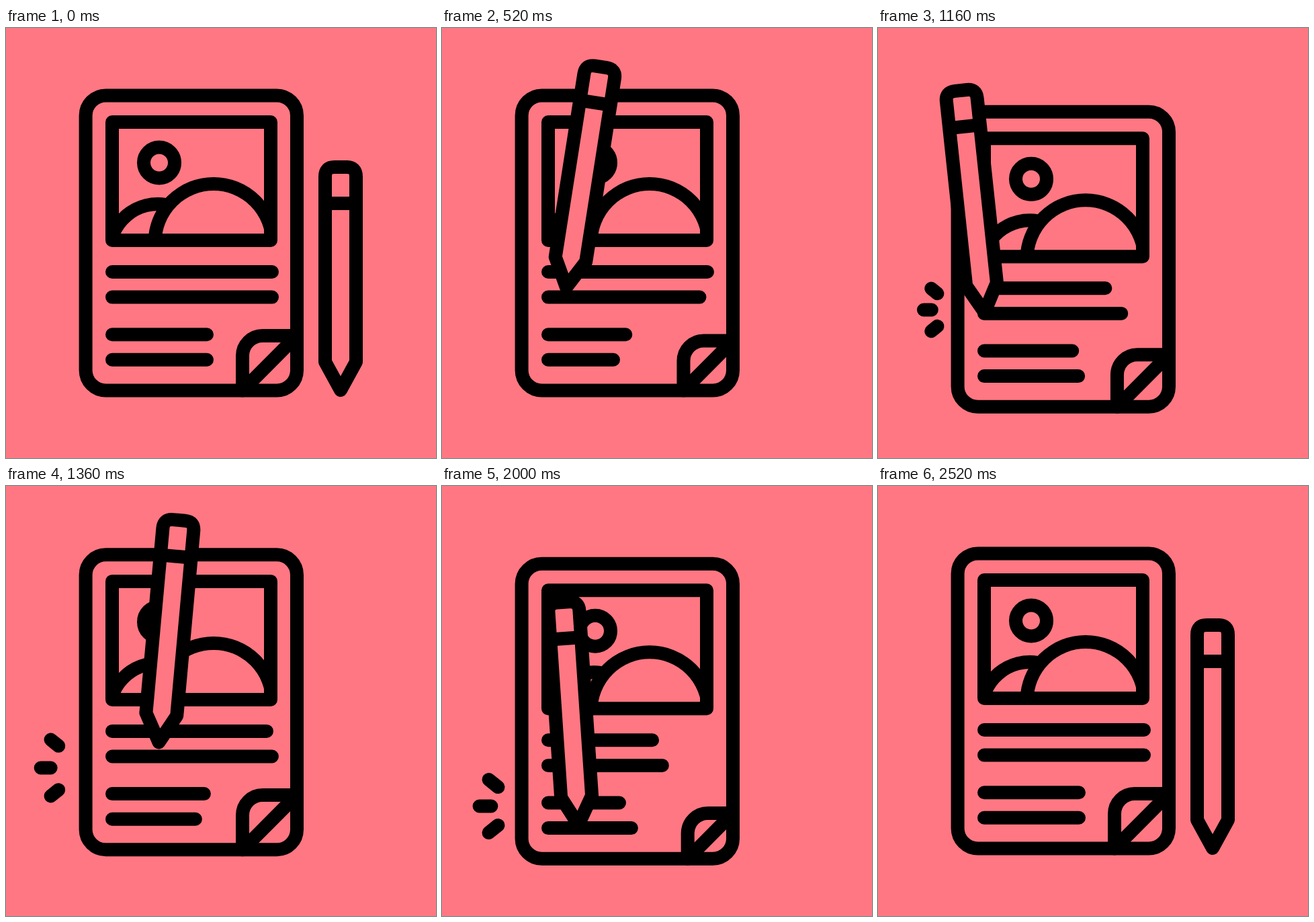
An HTML page that plays this animation: 640x640 px, repeating every 3 s.

```html
<!DOCTYPE html>
<html lang="en">
<head>
<meta charset="utf-8">
<title>Page and pencil</title>
<style>
  html, body { margin: 0; width: 100%; height: 100%; overflow: hidden; background: #ff7782; }
  svg { display: block; width: 100vw; height: 100vh; }
</style>
</head>
<body>
<svg viewBox="0 0 640 640" fill="none" stroke="#000" stroke-width="20" stroke-linejoin="round">
  <clipPath id="frame"><rect x="158" y="140" width="236" height="176"/></clipPath>
  <path id="sparks" stroke-linecap="round"/>
  <g id="page">
    <rect x="118.6" y="100.4" width="314.4" height="439" rx="30"/>
    <g clip-path="url(#frame)">
      <path d="M154 334A72 72 0 0 1 238 263"/>
      <circle cx="309" cy="319.5" r="87.5"/>
    </g>
    <rect x="158" y="140" width="236" height="176"/>
    <circle cx="228" cy="200.5" r="23"/>
    <path id="lines" stroke-linecap="round"/>
    <path id="fold" stroke-linecap="round"/>
  </g>
  <g id="pencil">
    <path fill="#ff7782" d="M-23-52V-328q0-14 14-14h18q14 0 14 14V-52L0-10Z"/>
    <path d="M-23-288H23"/>
  </g>
</svg>
<script>
const LOOP = 3000, STEP = 40;
const set = (id, name, value) => document.getElementById(id).setAttribute(name, value);
const clamp = v => Math.min(1, Math.max(0, v));
const wave = p => p > 0 && p < 1 ? Math.sin(Math.PI * p) ** 2 : 0;
const twice = (t, start, length) => wave((t - start) / length) + wave((t - start - length) / length);

// Pencil poses: swing up, strike, lift, strike lower, return to rest
const rest = { x: 498, y: 549, tilt: 0 };
const poses = [
  { at: 220, ...rest },
  { at: 520, x: 183.4, y: 395.7, tilt: 8.9 },
  { at: 780, x: 188, y: 370, tilt: 9.2 },
  { at: 1160, x: 159.6, y: 433, tilt: -6.1 },
  { at: 1360, x: 226.6, y: 391.5, tilt: 5.2 },
  { at: 1760, x: 199.4, y: 413.5, tilt: 3.1 },
  { at: 1880, x: 152, y: 488, tilt: -5 },
  { at: 2200, x: 362, y: 538.5, tilt: -1 },
  { at: 2510, ...rest }
];

// Monotone cubic curve through one property of the poses
function pose(key, t) {
  const last = poses.length - 1;
  if (t <= poses[0].at || t >= poses[last].at) return rest[key];
  const rate = i => (poses[i + 1][key] - poses[i][key]) / (poses[i + 1].at - poses[i].at);
  const slope = i => {
    if (i === 0 || i === last) return 0;
    const a = rate(i - 1), b = rate(i);
    return a * b > 0 ? 2 * a * b / (a + b) : 0;
  };
  const i = poses.findIndex(p => p.at > t) - 1;
  const from = poses[i], to = poses[i + 1];
  const d = to.at - from.at, u = (t - from.at) / d, v = 1 - u;
  return v * v * (1 + 2 * u) * from[key] + u * u * (3 - 2 * u) * to[key]
    + d * u * v * (v * slope(i) - u * slope(i + 1));
}

// Two long lines, a gap, two short lines; the lowest moves first
function linePath(t) {
  let d = "";
  for (let i = 0; i < 4; i++) {
    const long = i < 2;
    const y = 363 + 37.6 * i + (long ? 0 : 18);
    const pull = (long ? 86 : 66) * twice(t, 225 + 87 * (3 - i), 970);
    d += `M158 ${y}H${(long ? 396 : 299) - pull}`;
  }
  return d;
}

// Three rays fan out to the left; the tail follows the head
function burst(age, hubY) {
  if (age <= 0 || age >= 550) return "";
  const head = 1 - (1 - clamp(age / 330)) ** 2;
  const tail = (1 - Math.cos(Math.PI * clamp((age - 30) / 520))) / 2;
  let d = "";
  for (let i = -1; i <= 1; i++) {
    const angle = i * 39 * Math.PI / 180;
    const point = p => {
      const r = 38 + 29.5 * p;
      return `${118.5 - r * Math.cos(angle)} ${hubY + r * Math.sin(angle)}`;
    };
    d += `M${point(tail)}L${point(head)}`;
  }
  return d;
}

function draw(t) {
  const sink = 25 * (wave((t - 850) / 560) + wave((t - 1600) / 560));
  set("page", "transform", `translate(0 ${sink})`);
  set("lines", "d", linePath(t));

  const s = 14.5 * twice(t, 235, 1120), x = 352 + s, y = 458 + s;
  set("fold", "d", `M${x} 539.4V${y + 30}a30 30 0 0 1 30-30H433L${x} 539.4`);

  set("sparks", "d", burst(t - 1080, 419.5) + burst(t - 1800, 476.5));
  set("pencil", "transform",
    `translate(${pose("x", t)} ${pose("y", t)}) rotate(${pose("tilt", t)})`);
}

function tick() {
  const t = performance.now() % LOOP;
  const held = Math.floor(t / STEP) * STEP;
  draw(held < 240 ? 0 : held);
  requestAnimationFrame(tick);
}
tick();
</script>
</body>
</html>
```
